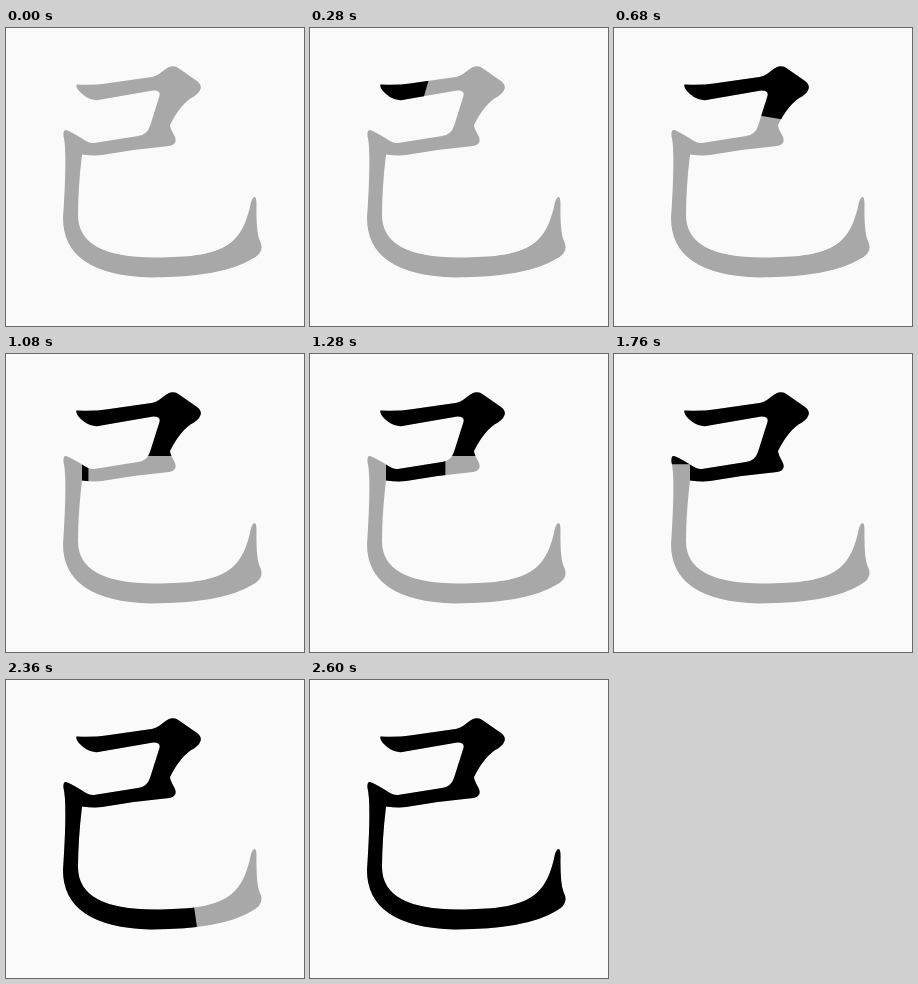
An HTML page for the animation above (3520 ms loop, 298 px wide and 298 px high).

```html
<!DOCTYPE html>
<html lang="zh">
<head>
<meta charset="utf-8">
<title>己 stroke order</title>
<style>
  html, body { margin: 0; width: 100%; height: 100%; overflow: hidden; background: #fafafa; }
  svg { display: block; width: 100%; height: 100%; }
  .ink { fill: none; stroke: #000; stroke-width: 46; stroke-linejoin: round; }
</style>
</head>
<body>
<svg viewBox="0 0 298 298">
  <defs>
    <path id="glyph" d="M70.5 56.5Q88 57.5 100 55.5L142 49.5Q150 49 157 43Q166 35 173 40.5L191 53Q200 60 188 68.500
      Q175 75 164 97Q164 100 168 107Q173 116 163 118Q130 121 96 127Q88 128 76 126.500
      Q72 160 72 187Q72 230 150 229.500C215 229 236 220 245 174Q247 169 248.500 169Q250.500 169 250.500 176
      Q250 203 253.500 212Q260 224 246 231Q217 249 145 249.500Q57 247 57 190Q61.500 123 57.500 108
      Q57 101.500 60 102Q64 103 80 113Q84 115.500 88 115L132 108Q141 107 144 98L153.500 68
      Q155 62 147 62.500L95 71.500Q88 74 80 69Q69 61 70.500 56.500Z"/>
    <clipPath id="shape"><use href="#glyph"/></clipPath>
    <clipPath id="top"><path d="M0 0H298V102H0Z"/></clipPath>
    <clipPath id="middle"><path d="M76 102H298V128H76Z"/></clipPath>
    <clipPath id="hook"><path d="M0 90H76V128H298V298H0Z"/></clipPath>
  </defs>
  <use href="#glyph" fill="#a8a8a8"/>
  <g clip-path="url(#shape)">
    <path class="ink" pathLength="1" clip-path="url(#top)" d="M66 46L118 61L150 54Q194 46 162 78L157 108"/>
    <path class="ink" pathLength="1" clip-path="url(#middle)" d="M75 115H172"/>
    <path class="ink" pathLength="1" clip-path="url(#hook)"
      d="M66 101V185Q66 219 88.500 228Q112 239 150 240C215 240 252 228 249 164"/>
  </g>
</svg>
<script>
const LOOP = 3520, STEP = 40;

// Timing of each brush route; power below 1 slows down, above 1 speeds up
const timing = [
  { from: 120, to: 760, power: 0.85 },
  { from: 1040, to: 1400, power: 1.17 },
  { from: 1720, to: 2600, power: 1.17 }
];
const inks = document.querySelectorAll('.ink');
const clamp = v => Math.min(1, Math.max(0, v));

function render(ms) {
  const t = Math.floor(ms % LOOP / STEP) * STEP;
  timing.forEach(({ from, to, power }, i) => {
    const drawn = clamp((t - from) / (to - from)) ** power;
    inks[i].setAttribute('stroke-dasharray', `${drawn} 2`);
  });
}

const start = performance.now();
function tick() {
  render(performance.now() - start);
  requestAnimationFrame(tick);
}
tick();
</script>
</body>
</html>
```
